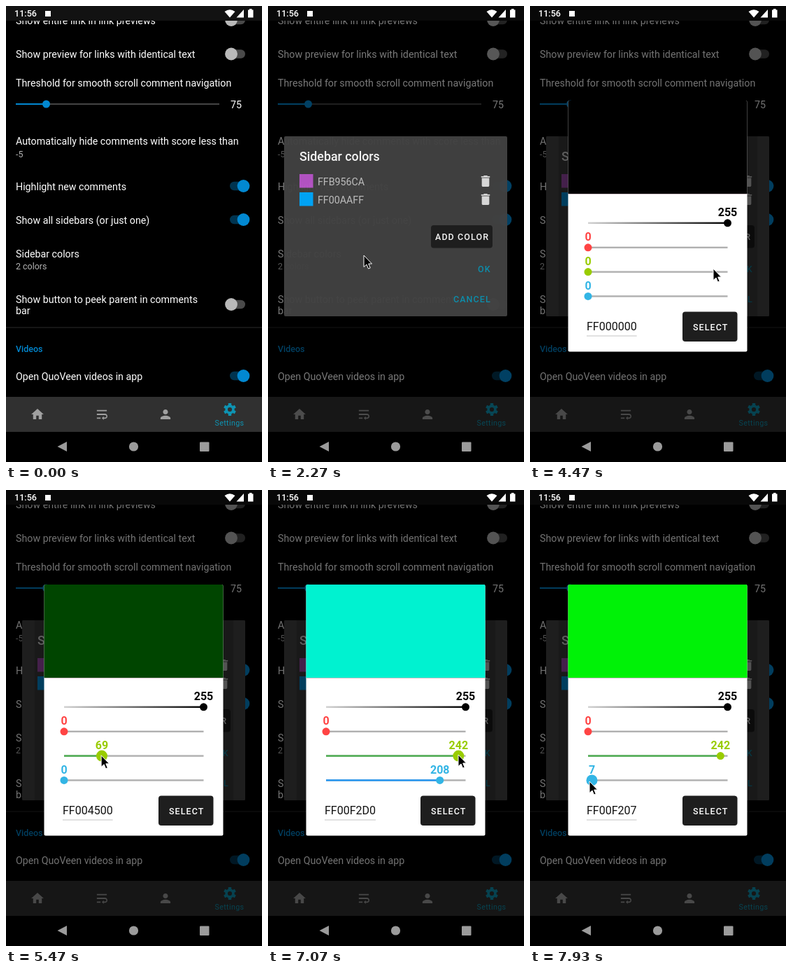
Animation, 366 px wide and 651 px high, one loop 8000 ms. Source, as an HTML page:

```html
<!DOCTYPE html>
<html lang="en">
<head>
<meta charset="utf-8">
<title>Sidebar colors</title>
<style>
  html, body { margin: 0; width: 100%; height: 100%; overflow: hidden; background: #000; }
  svg { display: block; width: 366px; height: 651px; font-family: Roboto, sans-serif; font-size: 14.24px; }
  text { white-space: pre; }
  .small { font-size: 12.46px; }
  .medium { font-weight: 500; }
  .button { font-size: 12.46px; font-weight: 500; letter-spacing: 1.1px; }
  .value { font-size: 16px; font-weight: 700; text-anchor: middle; }
</style>
</head>
<body>
<svg id="stage" viewBox="0 0 366 651" xmlns="http://www.w3.org/2000/svg"></svg>
<script>
const BLUE = '#0288d1', TEAL = '#0e94b3', DIM = 0.55;
const STEP = 1000 / 15, STEPS = 120;
const SLIDER_X = 83, SLIDER_W = 199.5;

const text = (x, y, s, fill = '#fff', cls = '', extra = '') =>
  `<text x="${x}" y="${y}" fill="${fill}" class="${cls}" ${extra}>${s}</text>`;
const rect = (x, y, w, h, fill, rx = 0, extra = '') =>
  `<rect x="${x}" y="${y}" width="${w}" height="${h}" fill="${fill}" rx="${rx}" ${extra}/>`;
const disc = (x, y, r, fill, extra = '') =>
  `<circle cx="${x}" cy="${y}" r="${r}" fill="${fill}" ${extra}/>`;
const icon = (x, y, d, fill, scale = 0.89) =>
  `<path transform="translate(${x} ${y}) scale(${scale}) translate(-12 -12)" fill="${fill}" d="${d}"/>`;
const toggle = (y, on) =>
  rect(320, y - 6.2, 22, 12.4, on ? '#003450' : '#4a4a4a', 6.2) +
  disc(on ? 339.5 : 322, y, 8.9, on ? BLUE : '#b9b9b9');

const HOME = 'M10 20v-6h4v6h5v-8h3L12 3 2 12h3v8z';
const WRAP = 'M4 19h6v-2H4zM20 5H4v2h16zM17 11H4v2h13.25c1.1 0 2 .9 2 2s-.9 2-2 2H15v-2l-3 3 3 3v-2h2c2.2 0 4-1.8 4-4s-1.8-4-4-4z';
const PERSON = 'M12 12c2.2 0 4-1.8 4-4s-1.8-4-4-4-4 1.8-4 4 1.8 4 4 4zm0 2c-2.7 0-8 1.3-8 4v2h16v-2c0-2.7-5.3-4-8-4z';
const TRASH = 'M6 19c0 1.1.9 2 2 2h8c1.1 0 2-.9 2-2V7H6zM19 4h-3.5l-1-1h-5l-1 1H5v2h14z';

function gear(x, y) {
  let s = `<circle r="4.9" fill="none" stroke="${TEAL}" stroke-width="3.6"/>`;
  for (let a = 0; a < 360; a += 60) s += rect(-2.2, -9, 4.4, 4, TEAL, 0.6, `transform="rotate(${a})"`);
  return `<g transform="translate(${x} ${y})">${s}</g>`;
}

function settingsPage() {
  const rows = [
    [26, 'Show entire link in link previews'],
    [74, 'Show preview for links with identical text'],
    [115, 'Threshold for smooth scroll comment navigation'],
    [198, 'Automatically hide comments with score less than'],
    [263, 'Highlight new comments'],
    [311, 'Show all sidebars (or just one)'],
    [359, 'Sidebar colors'],
    [424, 'Show button to peek parent in comments'],
    [440, 'bar'],
    [534, 'Open QuoVeen videos in app']
  ];
  return rows.map(([y, s]) => text(14, y, s)).join('') +
    text(14, 215.5, '-5', '#b4b4b4', 'small') +
    text(14, 376, '2 colors', '#b4b4b4', 'small') +
    text(14, 493.5, 'Videos', BLUE, 'small medium') +
    text(321, 146, '75') +
    toggle(20, false) + toggle(68.5, false) + toggle(257, true) +
    toggle(305, true) + toggle(426, false) + toggle(528, true) +
    rect(14, 139, 291, 2, '#444') + rect(14, 139, 43, 2, BLUE) + disc(57.5, 140, 5.5, BLUE) +
    rect(0, 458.5, 366, 1, '#2c2c2c') +
    rect(0, 0, 366, 21, '#121212') +
    rect(0, 558, 366, 50, '#303030') +
    icon(45, 583, HOME, '#a0a0a0') + icon(137, 583, WRAP, '#a0a0a0') + icon(228, 583, PERSON, '#a0a0a0') +
    gear(320, 576) +
    text(298.5, 599, 'Settings', TEAL, '', 'font-size="10.7" letter-spacing=".36"');
}

function systemBars() {
  return text(12, 15, '11:56', '#fff', 'medium', 'font-size="12.6"') +
    rect(56, 7, 8, 8, '#fff') +
    '<path fill="#fff" d="M312.5 8Q320 2.500 327.500 8L320 16.500ZM329.500 16.500L340 5V16.500ZM346 5.500H348V4H351.500V5.500H353.500V16.500H346Z"/>' +
    rect(0, 608, 366, 43, '#000') +
    '<path fill="#9b9b9b" d="M73.500 629L87 622V636Z"/>' +
    disc(182.5, 629, 6.6, '#9b9b9b') + rect(277, 622.5, 13.5, 13.5, '#9b9b9b', 1);
}

function colorList() {
  const entry = (y, name) =>
    rect(45, y - 10, 19.5, 19.5, '#' + name.slice(2)) +
    text(71, y + 5.5, name, '#c6c6c6') + icon(311, y, TRASH, '#e0e0e0');
  return rect(23, 186, 319, 257, '#424242', 2) +
    text(45, 221, 'Sidebar colors', '#fff', 'medium', 'font-size="17.8"') +
    entry(250, 'FFB956CA') + entry(276, 'FF00AAFF') +
    rect(233, 313, 88, 32.5, '#202020', 4) + text(239, 333.5, 'ADD COLOR', '#fff', 'button') +
    text(300, 380, 'OK', TEAL, 'button') + text(265, 422.5, 'CANCEL', TEAL, 'button');
}

function slider(id, y, thumb, bar) {
  const track = id === 'alpha' ? 'url(#fade)' : '#b0b0b0';
  return rect(SLIDER_X, y - 1.2, SLIDER_W, 2.4, track) +
    rect(SLIDER_X, y - 1.2, 0, 2.4, bar, 0, `id="${id}Bar"`) +
    disc(SLIDER_X, y, 5.5, thumb, `id="${id}Thumb"`) +
    text(SLIDER_X, y - 9.7, '0', thumb, 'value', `id="${id}Value"`);
}

function picker() {
  return rect(54.5, 135, 256, 358.500, '#fff', 2) +
    '<path id="preview" d="M54.500 268.500V137Q54.500 135 56.500 135H308.500Q310.500 135 310.500 137V268.500Z"/>' +
    rect(54.5, 268, 256, 1, '#cdbfc6') +
    slider('alpha', 309.8, '#000', 'none') +
    slider('red', 344.8, '#ff4444', '#f44336') +
    slider('green', 379.6, '#99cc00', '#4caf50') +
    slider('blue', 414.4, '#33b5e5', '#2196f3') +
    text(81, 463, 'FF000000', '#111', '', 'id="hex" font-size="16"') +
    rect(81, 470.5, 71, 1, '#c4c4c4', 0, 'id="underline"') +
    rect(218, 436.5, 78.5, 42.5, '#1e1e1e', 4) + text(233, 462.5, 'SELECT', '#fff', 'button');
}

document.getElementById('stage').innerHTML =
  '<defs><linearGradient id="fade" gradientUnits="userSpaceOnUse" x1="83" x2="282" y1="0" y2="0">' +
  '<stop stop-color="#d2d2d2"/><stop offset="1"/></linearGradient></defs>' +
  rect(0, 0, 366, 651, '#000') + settingsPage() +
  rect(0, 0, 366, 608, '#000', 0, 'id="dim"') + systemBars() +
  `<g id="list">${colorList()}</g>` +
  `<g id="listDim">${rect(23, 186, 319, 257, '#000', 2, `opacity="${DIM}"`)}${rect(41, 186, 284, 257, '#000', 0, 'opacity=".18"')}</g>` +
  `<g id="picker">${picker()}</g>` +
  '<path id="cursor" d="M0 0V16.500L4 13L6.500 19L9.200 18L6.700 12H11.500Z" fill="#000" stroke="#fff" stroke-width="1" stroke-linejoin="round"/>';

const el = {};
document.querySelectorAll('svg [id]').forEach(n => el[n.id] = n);
const set = (id, attrs) => { for (const k in attrs) el[id].setAttribute(k, attrs[k]); };

// Each track row: step, then the values reached at that step.
const CURSOR = [
  [19, 322, 377], [22, 205, 354], [24, 141, 351], [25, 137, 356],
  [41, 137, 356], [47, 278, 324], [62, 278, 324], [67, 262, 375],
  [70, 262, 375], [79, 129, 379], [89, 162, 378], [95, 247, 418],
  [100, 247, 418], [106, 272, 378], [109, 272, 378], [112, 210, 417],
  [113, 182, 418], [119, 85, 416]
];
const LEVELS = {
  alpha: [[0, 255]],
  red: [[0, 0]],
  green: [[69, 0], [70, 229], [79, 60], [89, 102], [104, 102], [106, 242]],
  blue: [[96, 0], [97, 208], [111, 208], [112, 170], [113, 170], [114, 126], [119, 7]]
};
const PRESSED = { green: [[71, 89], [106, 107]], blue: [[98, 100], [115, 119]] };
const PICKER_ALPHA = [[55, 0], [56, 0.55], [57, 0.88], [58, 1]];

function sample(track, k) {
  const i = track.findIndex(row => row[0] > k);
  if (i === 0) return track[0].slice(1);
  if (i < 0) return track[track.length - 1].slice(1);
  const a = track[i - 1], b = track[i];
  const p = (k - a[0]) / (b[0] - a[0]), e = p * p * (3 - 2 * p);
  return a.slice(1).map((v, j) => v + (b[j + 1] - v) * e);
}

const hexByte = v => v.toString(16).toUpperCase().padStart(2, '0');

function draw(k) {
  const p = Math.min(1, Math.max(0, (k - 28) / 7));
  const shown = 1 - Math.pow(1 - p, 1.6);
  set('dim', { opacity: DIM * shown });
  set('list', { opacity: shown });
  set('listDim', { opacity: k >= 56 ? 1 : 0 });
  set('picker', { opacity: sample(PICKER_ALPHA, k)[0] });

  const level = {};
  for (const id in LEVELS) {
    const v = level[id] = Math.round(sample(LEVELS[id], k)[0]);
    const w = v / 255 * SLIDER_W;
    const held = (PRESSED[id] || []).some(([from, to]) => k >= from && k <= to);
    set(id + 'Bar', { width: w });
    set(id + 'Thumb', { cx: SLIDER_X + w, r: held ? 8 : 5.5 });
    set(id + 'Value', { x: SLIDER_X + w });
    el[id + 'Value'].textContent = v;
  }
  set('preview', { fill: `rgb(${level.red},${level.green},${level.blue})` });
  el.hex.textContent = ['alpha', 'red', 'green', 'blue'].map(id => hexByte(level[id])).join('');
  set('underline', { width: el.hex.getComputedTextLength() });

  const [x, y] = sample(CURSOR, k);
  set('cursor', { transform: `translate(${x} ${y})`, opacity: k >= 19 ? 1 : 0 });
}

const start = performance.now();
function tick() {
  const t = Math.max(0, performance.now() - start);
  draw(Math.floor((t + 4) / STEP) % STEPS);
  requestAnimationFrame(tick);
}
tick();
</script>
</body>
</html>
```
